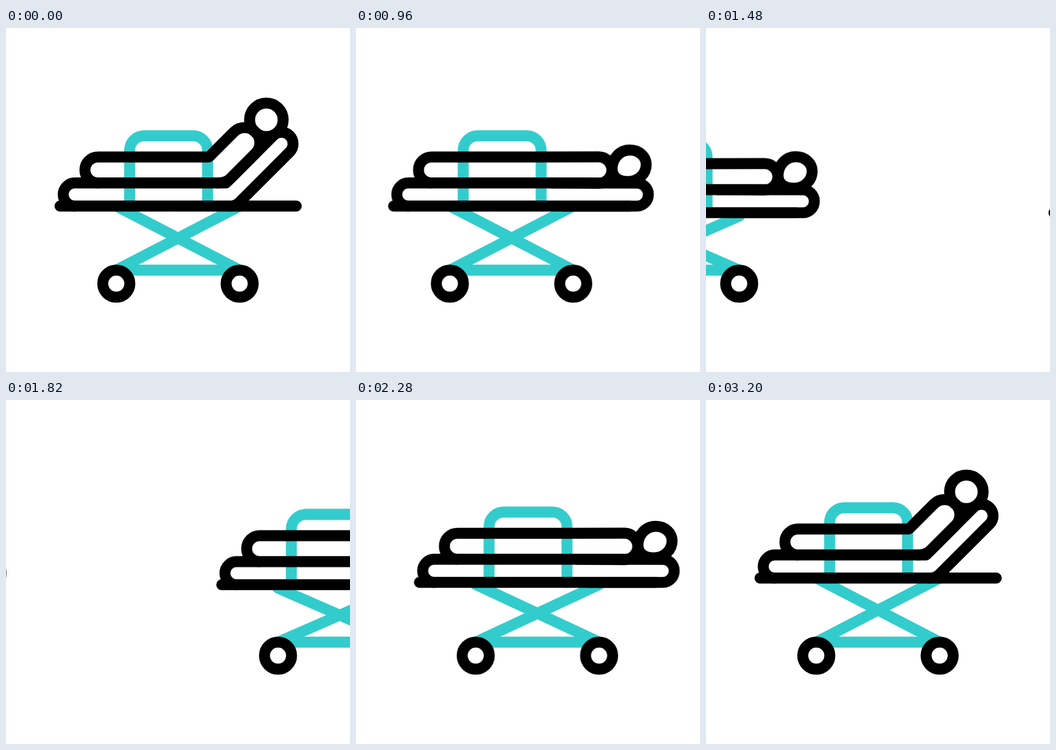
Animation of 640x640 px, one loop 3600 ms. Source, as an HTML page:

```html
<!DOCTYPE html>
<html lang="en">
<head>
<meta charset="utf-8">
<title>Stretcher</title>
<style>
  html, body { margin: 0; width: 100%; height: 100%; overflow: hidden; background: #fff; }
  svg { display: block; width: 100%; height: 100%; }

  .gurney { fill: none; stroke: #000; stroke-width: 20.4; stroke-linecap: round; stroke-linejoin: round; }
  .teal { stroke: #33cccc; }

  .gurney, .gurney * {
    animation: 3600ms cubic-bezier(.333, 0, .667, 1) infinite;
  }
  .leaving { animation-name: leave; }
  .arriving { animation-name: arrive; }
  .gurney .top { animation-name: sink; }
  .gurney .legs { animation-name: squash; }
  .gurney .body { animation-name: body; }
  .gurney .mattress { animation-name: mattress; }
  .gurney .head { animation-name: head; }

  /* Travel */
  @keyframes leave {
    0%, 22.2222% { transform: translateX(0); }
    55.5556%, 100% { transform: translateX(-621px); }
  }
  @keyframes arrive {
    0%, 33.3333% { transform: translateX(635px); }
    66.6667%, 100% { transform: translateX(0); }
  }

  /* The bed rides lower while the wheels stay on the ground */
  @keyframes sink {
    0%, 33.3333%, 66.6667%, 100% { transform: translateY(0); }
    39.7%, 61.1111% { transform: translateY(12.4px); }
  }
  @keyframes squash {
    0%, 33.3333%, 66.6667%, 100% { d: path("M205 331.3L435 450.5M435 331.3L205 450.5L435 450.5"); }
    39.7%, 61.1111% { d: path("M205 350L435 450.5M435 350L205 450.5L435 450.5"); }
  }

  /* Backrest: down, then up again */
  @keyframes body {
    0%, 88.8889%, 100% {
      d: path("M171 288.3A20 20 0 0 1 171 240L377.5 240L424 193.5A20 20 0 0 1 464 233.5L418 279.6Q409.3 288.3 393 288.3");
    }
    16.6667%, 72.2222% {
      d: path("M171 288.3A20 20 0 0 1 171 240L377.5 240L482 239.7A20 20 0 0 1 482 289L427 288.5Q409.3 288.3 393 288.3");
      animation-timing-function: cubic-bezier(.5, 0, .5, 1);
    }
  }
  @keyframes mattress {
    0%, 88.8889%, 100% {
      d: path("M128 331.3A20 20 0 0 1 128 288.3L409.3 288.3L497.3 200.3A20 20 0 0 1 527.7 230.7L434 324.4Q427 331.3 416 331.3");
    }
    16.6667%, 72.2222% {
      d: path("M128 331.3A20 20 0 0 1 128 288.3L428 288.3L553 288.5A20 20 0 0 1 553 331.4L434 331.4Q427 331.3 416 331.3");
      animation-timing-function: cubic-bezier(.5, 0, .5, 1);
    }
  }
  @keyframes head {
    0%, 88.8889%, 100% {
      d: path("M484.4 139.6C501.6 139.6 515.6 153.6 515.6 170.8C515.6 188 501.6 202 484.4 202C467.2 202 453.2 188 453.2 170.8C453.2 153.6 467.2 139.6 484.4 139.6Z");
    }
    16.6667%, 72.2222% {
      d: path("M540 227C557 227 570.5 239 570.5 254C570.5 271.5 555.5 285.7 537 285.7C518 285.7 507 277.5 507 262C507 242.5 521.5 227 540 227Z");
      animation-timing-function: cubic-bezier(.5, 0, .5, 1);
    }
  }
</style>
</head>
<body>
<svg viewBox="0 0 640 640">
  <g class="gurney leaving">
    <path class="teal legs"/>
    <g class="top">
      <path class="teal" d="M230 331.3V227.5a27 27 0 0 1 27-27h91a27 27 0 0 1 27 27V331.3"/>
      <path d="M100.5 331.3H540"/>
      <path class="mattress"/>
      <path class="body"/>
      <path class="head"/>
    </g>
    <circle cx="205.2" cy="475.6" r="25.2"/>
    <circle cx="434.7" cy="475.6" r="25.2"/>
  </g>
</svg>
<script>
  // A second gurney comes in from the right while the first one leaves.
  const first = document.querySelector(".gurney");
  const second = first.cloneNode(true);
  second.classList.replace("leaving", "arriving");
  first.after(second);
</script>
</body>
</html>
```
